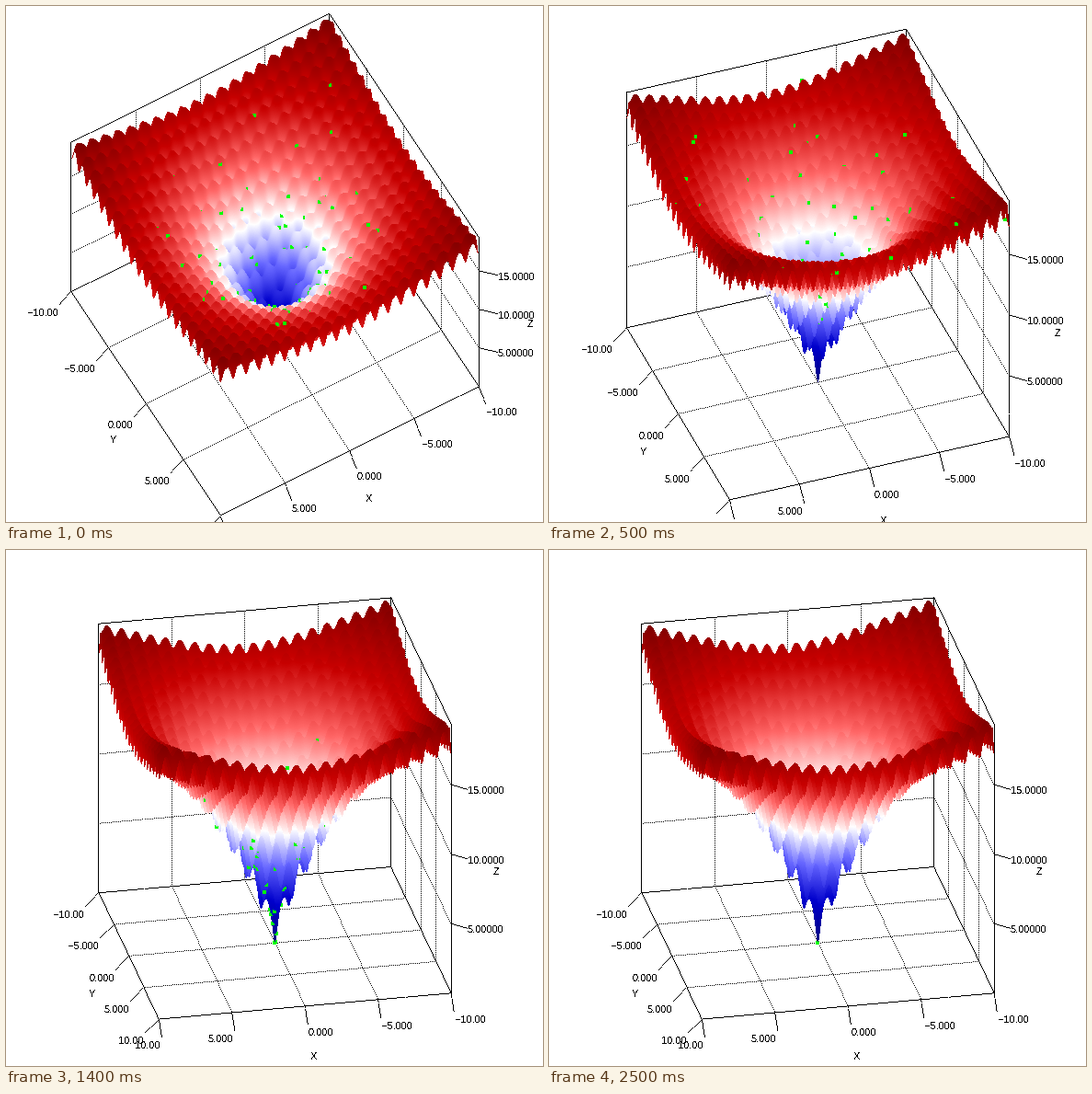
A matplotlib script that plays this animation: 584 px wide and 561 px high, repeating every 2600 ms.

```python
import numpy as np
import matplotlib.pyplot as plt
from matplotlib.animation import FuncAnimation
from matplotlib.colors import LinearSegmentedColormap

W, H, DPI = 584, 561, 64
FRAMES, INTERVAL = 26, 100
SIDE = 324.4            # edge of the plot cube in pixels
UNIT = SIDE / 20        # pixels per x/y unit
Z_MAX = 19.37
TICK = 0.92
CX, CY = 292.5, 281
HEAT = LinearSegmentedColormap.from_list("heat", [
    (0, 0, 0.5), (0, 0, 0.8), (0.4, 0.4, 1), (1, 1, 1),
    (1, 0.4, 0.4), (0.78, 0, 0), (0.5, 0, 0)], N=512)

AZIMUTH = [30, 30, 29.9, 29.4, 25.5, 20.2, 14.5, 11.75]
ELEVATION = [60, 60, 59.3, 56.9, 48, 37.9, 31, 25.8]


def ackley(x, y):
    bowl = 20 * np.exp(-0.2 * np.sqrt((x * x + y * y) / 2))
    ripple = np.exp((np.cos(2 * np.pi * x) + np.cos(2 * np.pi * y)) / 2)
    return 20 + np.e - bowl - ripple


def pose(t):
    if t < 8:
        return AZIMUTH[t], ELEVATION[t]
    return (11.7, 25.75) if t < 13 else (11.65, 25.6)


class Camera:
    def __init__(self, azimuth, elevation):
        a, e = np.radians([azimuth, elevation])
        self.ca, self.sa = np.cos(a), np.sin(a)
        self.ce, self.se = np.cos(e), np.sin(e)

    def project(self, x, y, z):
        """Screen x, screen y and nearness, all in pixels."""
        across = UNIT * (y * self.sa - x * self.ca)
        toward = UNIT * (x * self.sa + y * self.ca)
        up = (z / Z_MAX - 0.5) * SIDE
        return np.array([CX + across,
                         CY + toward * self.se - up * self.ce,
                         toward * self.ce + up * self.se])

    def point(self, p):
        return self.project(*p)[:2]


def draw_line(canvas, p, q, dotted=False):
    n = max(int(np.abs(q - p).max()), 1)
    t = np.linspace(0, 1, n + 1)[::2 if dotted else 1, None]
    x, y = np.floor(p + (q - p) * t).astype(int).T
    ok = (x >= 0) & (x < W) & (y >= 0) & (y < H)
    canvas[y[ok], x[ok]] = 0


def tick_marks():
    """Anchor, outward direction, axis and label text of every tick."""
    down = -Z_MAX / 20
    for v in (-10, -5, 0, 5, 10):
        text = f"{v:.{2 if abs(v) == 10 else 3}f}".replace("-", "\u2212")
        yield (v, 10, 0), (0, 1, down), "x", text
        yield (10, v, 0), (1, 0, down), "y", text
    for v, text in ((5, "5.00000"), (10, "10.0000"), (15, "15.0000")):
        yield (-10, 10, v), (-1, 1, 0), "z", text


TICKS = [(np.array(a, float), np.array(d, float), axis, text)
         for a, d, axis, text in tick_marks()]
NAMES = [("X", np.array([0, 10, 0.0]), np.array([0, 1, -Z_MAX / 20])),
         ("Y", np.array([10, 0, 0.0]), np.array([1, 0, -Z_MAX / 20])),
         ("Z", np.array([-10, 10, Z_MAX / 2]), np.array([-1, 1, 0.0]))]


def draw_box(canvas, cam):
    def seg(p, q, dotted=False):
        draw_line(canvas, cam.point(p), cam.point(q), dotted)

    for v in (-5, 0, 5):
        seg((v, -10, 0), (v, 10, 0), True)
        seg((-10, v, 0), (10, v, 0), True)
        seg((v, -10, 0), (v, -10, Z_MAX), True)
        seg((-10, v, 0), (-10, v, Z_MAX), True)
    for z in (5, 10, 15):
        seg((10, -10, z), (-10, -10, z), True)
        seg((-10, -10, z), (-10, 10, z), True)
    left, near, right, far = (10, -10), (10, 10), (-10, 10), (-10, -10)
    for p, q in ((left, near), (near, right), (right, far), (far, left)):
        seg((*p, 0), (*q, 0))
    for p in (left, right, far):
        seg((*p, 0), (*p, Z_MAX))
    seg((*left, Z_MAX), (*far, Z_MAX))
    seg((*far, Z_MAX), (*right, Z_MAX))
    for anchor, out, _, _ in TICKS:
        seg(anchor, anchor + TICK * out)


def draw_surface(canvas, cam):
    """Paint the surface back to front; return the nearness of each pixel."""
    reach = 0.7072 * SIDE
    cols = np.arange(int(CX - reach), int(CX + reach) + 1)
    across = ((cols + 0.5 - CX) / UNIT).astype(np.float32)[None, :]
    toward = (np.linspace(-reach, reach, 4000) / UNIT).astype(np.float32)[:, None]
    x = toward * np.float32(cam.sa) - across * np.float32(cam.ca)
    y = across * np.float32(cam.sa) + toward * np.float32(cam.ca)
    inside = (np.abs(x) <= 10) & (np.abs(y) <= 10)
    x, y = x[inside], y[inside]
    z = ackley(x, y)
    _, sy, near = cam.project(x, y, z)
    column = np.broadcast_to(cols, inside.shape)[inside]
    row = np.clip(sy.astype(int), 0, H - 1)
    top = np.full((H, W), -1)
    top[row, column] = np.arange(z.size)   # later samples are nearer
    hit = top >= 0
    depth = np.full((H, W), -np.inf)
    depth[hit] = near[top[hit]]
    canvas[hit] = HEAT(z[top[hit]] / Z_MAX, bytes=True)[:, :3]
    return depth


scenes = {}


def scene(angles):
    if angles not in scenes:
        cam = Camera(*angles)
        canvas = np.full((H, W, 3), 255, np.uint8)
        draw_box(canvas, cam)
        scenes[angles] = cam, canvas, draw_surface(canvas, cam)
    return scenes[angles]


# Swarm: swinging searchers that settle at the minimum one after another.
COUNT, STRAYS = 84, 3
rng = np.random.default_rng(12)
settle = rng.uniform(9, 25, COUNT)
settle[:STRAYS] = 25
power = np.where(np.arange(COUNT) < STRAYS, 0.25, 1.3)
swing = rng.uniform(0.4, 1.7, (2, COUNT))
phase = rng.uniform(0, 2 * np.pi, (2, COUNT))
rate = rng.uniform(0.4, 1.3, (2, COUNT))


def swarm(t):
    fade = np.clip(1 - t / settle, 0, 1) ** power * min(1, 0.5 + 0.2 * t)
    return np.clip(10 * fade * swing * np.cos(phase + rate * t), -10, 10)


def draw_swarm(canvas, depth, cam, t):
    x, y = swarm(t)
    for sx, sy, near in cam.project(x, y, ackley(x, y)).T:
        c, r = max(round(sx) - 2, 0), max(round(sy) - 2, 0)
        box = np.s_[r:r + 4, c:c + 4]
        canvas[box][depth[box] <= near + 1] = (0, 255, 0)


fig = plt.figure(figsize=(W / DPI, H / DPI), dpi=DPI, facecolor="white")
ax = fig.add_axes([0, 0, 1, 1])
ax.axis("off")
image = ax.imshow(np.full((H, W, 3), 255, np.uint8), extent=(0, W, H, 0),
                  aspect="auto", interpolation="nearest")


def make_text(text):
    return ax.text(0, 0, text, family="Liberation Sans", size=11 * 72 / DPI,
                   color="black", va="baseline", ha="center", antialiased=False)


tick_texts = [make_text(text) for *_, text in TICKS]
name_texts = [make_text(name) for name, *_ in NAMES]


def place_texts(cam):
    for label, (anchor, out, axis, _) in zip(tick_texts, TICKS):
        x, y = cam.point(anchor + TICK * out)
        y += 5 if axis == "z" else 12.5
        on_right = x > CX
        label.set_ha("left" if on_right else "right")
        label.set_position((round(x + (0.5 if on_right else -1.5)), round(y)))
        label.set_visible(y < H)
    for label, (_, anchor, out) in zip(name_texts, NAMES):
        x, y = cam.point(anchor + 2.53 * out)
        label.set_position((round(x), round(y + 4)))


def update(t):
    cam, base, depth = scene(pose(t))
    canvas = base.copy()
    draw_swarm(canvas, depth, cam, t)
    image.set_data(canvas)
    place_texts(cam)
    return [image, *tick_texts, *name_texts]


anim = FuncAnimation(fig, update, frames=FRAMES, interval=INTERVAL,
                     repeat=True, repeat_delay=0, blit=False)
plt.show()
```
